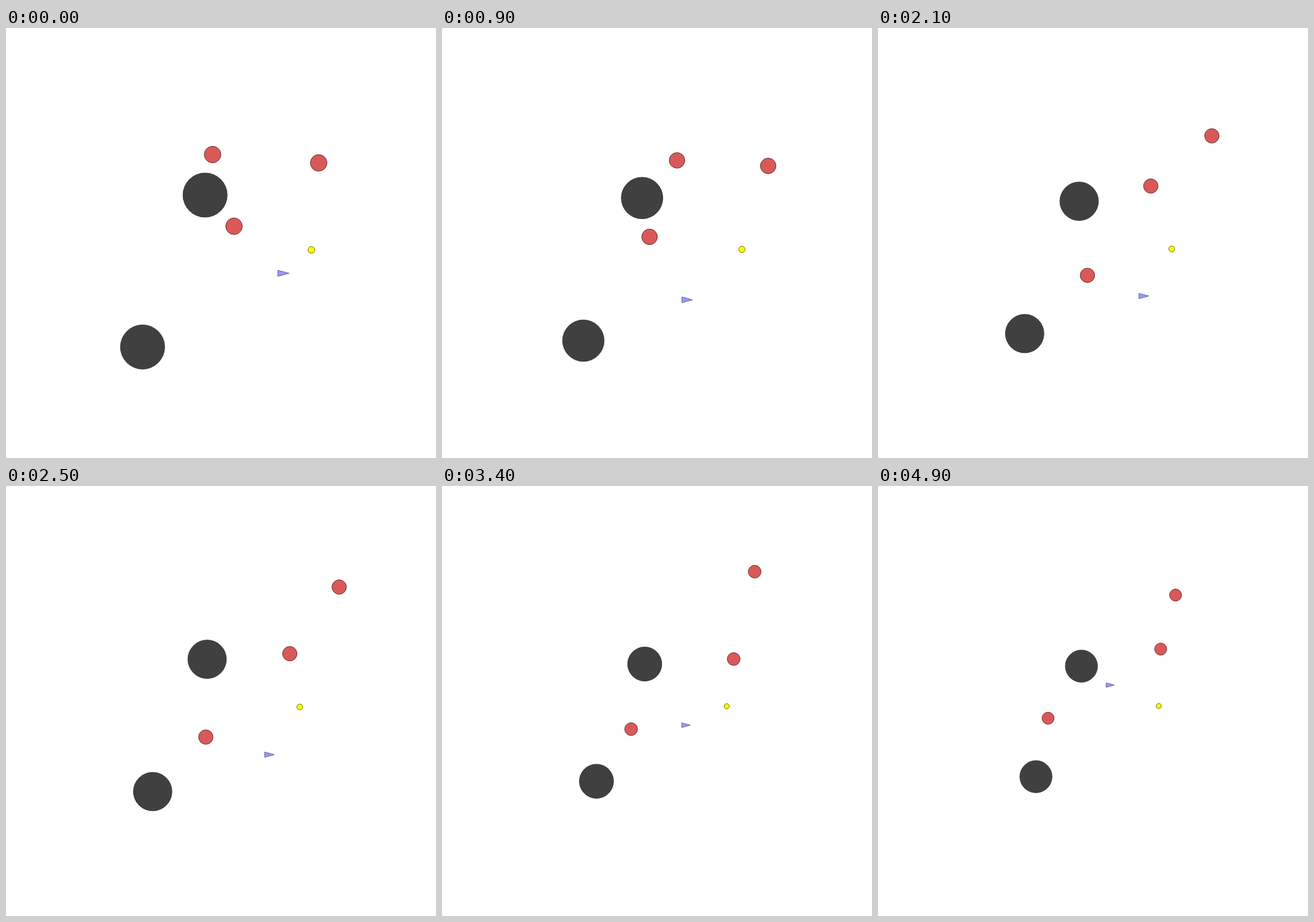
Write an HTML page with a canvas that moves like this. It is 700x700 px and loops after 5 s.

```html
<!DOCTYPE html>
<html>
<head>
<meta charset="utf-8">
<style>
html, body { margin: 0; height: 100%; overflow: hidden; background: #fff; }
canvas { display: block; width: 700px; height: 700px; }
</style>
</head>
<body>
<canvas id="stage" width="700" height="700"></canvas>
<script>
const ctx = document.getElementById('stage').getContext('2d');
const LOOP = 5000, STEP = 100, MID = 350;

// Waypoints that every moving body passes at the same moments
const TIMES = [0, 900, 1600, 2500, 3400, 4100, 4900];
const chasers = [
  [[336.3, 206], [382.6, 215.5], [416.8, 234.6], [462, 273], [474.8, 281.7], [485.4, 266], [460.2, 265.5]],
  [[509, 219.6], [531, 224.5], [538.4, 191.4], [542.4, 164.5], [509, 139.5], [497.7, 143.2], [484.4, 177.6]],
  [[371.2, 322.7], [337.9, 340], [356.6, 385.7], [325.3, 408.7], [307.9, 395.8], [294.2, 396.6], [276.9, 378]]
];
const runner = [
  [451.7, 399.3], [399.2, 442.5], [428.6, 429], [429, 437.4], [397.3, 389.3], [385.5, 374], [378.1, 324]
];

const ramp = (t, from, to) => Math.min(1, Math.max(0, (t - from) / (to - from)));

// The camera backs away in two pulls
const zoom = t => 1 - .129 * ramp(t, 0, 1900) - .1435 * ramp(t, 2840, 3650);

// Smooth curve through the waypoints
function along(path, t) {
  const last = TIMES.length - 1;
  let i = 0;
  while (i < last - 1 && t >= TIMES[i + 1]) i++;
  const span = TIMES[i + 1] - TIMES[i], u = (t - TIMES[i]) / span;
  return [0, 1].map(k => {
    const slope = j => {
      const a = Math.max(j - 1, 0), b = Math.min(j + 1, last);
      return (path[b][k] - path[a][k]) / (TIMES[b] - TIMES[a]) * span;
    };
    const m = slope(i), n = slope(i + 1), rise = path[i + 1][k] - path[i][k];
    return path[i][k] + u * (m + u * (3 * rise - 2 * m - n + u * (m + n - 2 * rise)));
  });
}

function paint(fill, line) {
  ctx.fillStyle = fill;
  ctx.strokeStyle = line;
  ctx.fill();
  ctx.stroke();
}

function disc(x, y, r, fill, line) {
  ctx.beginPath();
  ctx.arc(x, y, r, 0, 2 * Math.PI);
  paint(fill, line);
}

function draw(t) {
  const z = zoom(t);
  const fixed = (x, y, r, fill, line) => disc(MID + x * z, MID + y * z, r * z, fill, line);
  ctx.clearRect(0, 0, 700, 700);

  fixed(-25.9, -78, 36, '#404040', '#383838');
  fixed(-127.7, 169.3, 36, '#404040', '#383838');
  fixed(147.2, 11.2, 5.5, '#ffff00', '#707000');
  for (const path of chasers) disc(...along(path, t), 13.5 * z, '#d95959', '#6c2d2d');

  const [x, y] = along(runner, t), w = 9.2 * z, h = 5 * z;
  ctx.beginPath();
  ctx.moveTo(x - w, y - h);
  ctx.lineTo(x + w, y);
  ctx.lineTo(x - w, y + h);
  ctx.closePath();
  paint('#9999f5', '#6868a8');
}

function tick() {
  const t = performance.now() % LOOP;
  draw(Math.floor(t / STEP) * STEP);
  requestAnimationFrame(tick);
}
tick();
</script>
</body>
</html>
```
